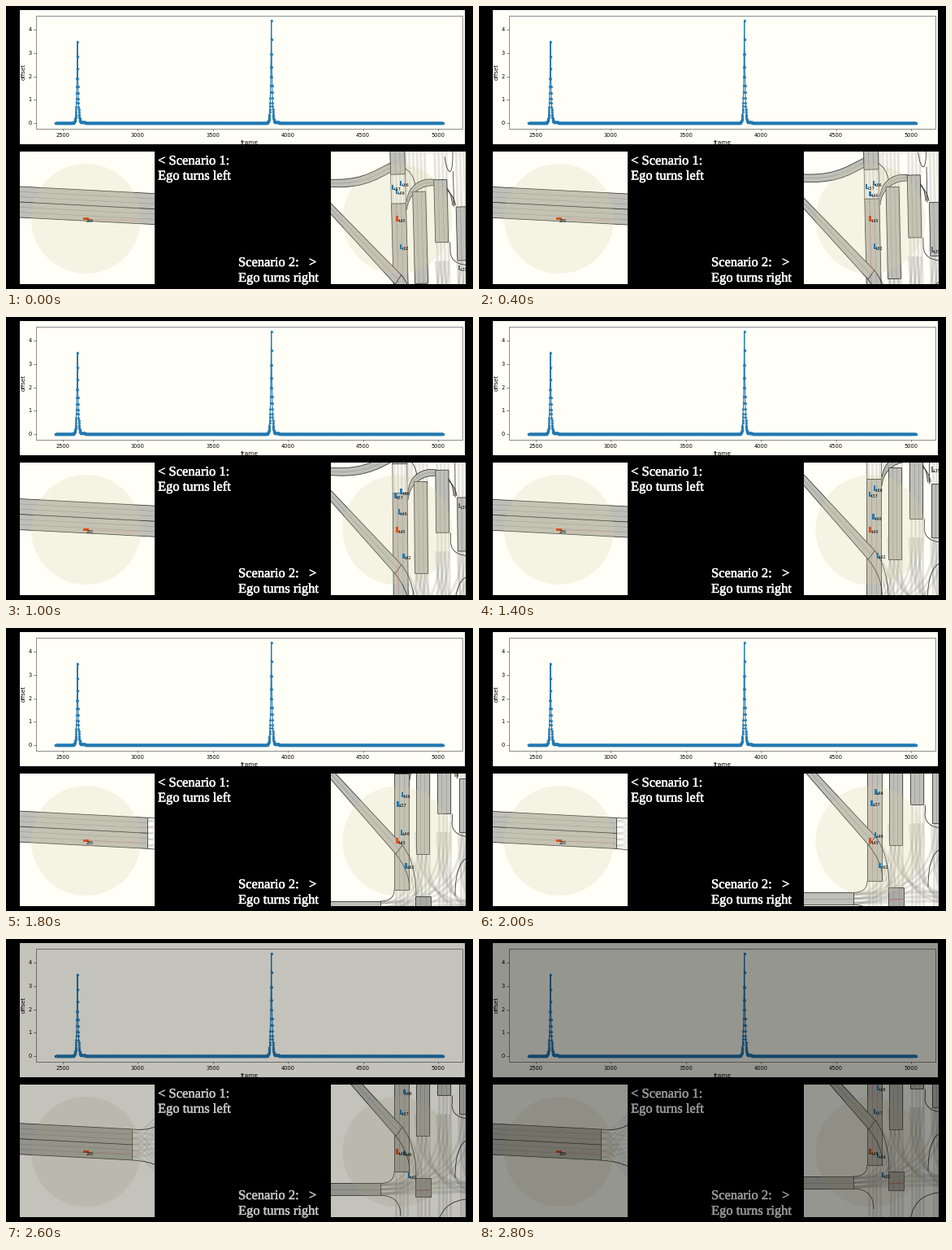
Recreate the animation shown at these times as a matplotlib script. Size 575 px wide and 348 px high, loop 3000 ms.

```python
import numpy as np
import matplotlib.pyplot as plt
from matplotlib.animation import FuncAnimation
from matplotlib.patches import Circle, PathPatch, Rectangle
from matplotlib.path import Path
from matplotlib.patheffects import withStroke
from matplotlib.transforms import Affine2D

W, H, DPI = 575, 348, 100
PT = 72 / DPI
PAPER, BLUE, ORANGE = "#fffff7", "#2279b2", "#d9531e"
DARK, GREY, PINK = "#33332f", "#8c8c88", "#e08a80"
FRAMES, STEP_MS = 15, 200
LAST = FRAMES - 2

fig = plt.figure(figsize=(W / DPI, H / DPI), dpi=DPI, facecolor="black")
ax = fig.add_axes([0, 0, 1, 1])
ax.set(xlim=(0, W), ylim=(H, 0))
ax.axis("off")
ax.autoscale(False)


def label(x, y, text, size, color="black", font="DejaVu Sans", **kw):
    return ax.text(x, y, text, fontsize=size * PT, color=color, family=font, **kw)


def panel(x0, y0, x1, y1):
    return ax.add_patch(Rectangle((x0, y0), x1 - x0, y1 - y0, fc=PAPER, lw=0))


# Offset chart
def chart_x(frame):
    return 70 + (frame - 2500) * 0.1848


def chart_y(offset):
    return 144 - 28.7 * offset


def peak(frame, center, height):
    d = frame - center
    return height * np.exp(-np.abs(d) / 5) + 0.04 * np.exp(-((d - 42) / 12) ** 2)


def draw_chart():
    panel(17, 5, 565, 170)
    ax.add_patch(Rectangle((36.5, 12), 525.5, 138.5, fill=False, ec="#444444", lw=0.6 * PT))
    for tick in range(2500, 5001, 500):
        x = chart_x(tick)
        ax.plot([x, x], [150.5, 153], color="#444444", lw=0.6 * PT)
        label(x, 159.3, str(tick), 6.7, ha="center", va="center")
    for tick in range(5):
        y = chart_y(tick)
        ax.plot([34, 36.5], [y, y], color="#444444", lw=0.6 * PT)
        label(31.5, y, str(tick), 6.7, ha="right", va="center")
    label(299.5, 167.7, "frame", 7.4, ha="center", va="center")
    label(21.7, 81.3, "offset", 7.2, ha="center", va="center", rotation=90)
    frame = np.arange(2452, 5032)
    offset = peak(frame, 2597, 3.5) + peak(frame, 3889, 4.4)
    ax.plot(chart_x(frame), chart_y(offset), color=BLUE, lw=1.1 * PT,
            marker="*", ms=3.7 * PT, mew=0.3)


# Road maps
def curve_path(points):
    kind = {2: Path.LINETO, 3: Path.CURVE3}.get(len(points), Path.CURVE4)
    return Path(points, [Path.MOVETO] + [kind] * (len(points) - 1))


class Scene:
    def __init__(self, x0, y0, x1, y1):
        self.frame = panel(x0, y0, x1, y1)
        self.view = Affine2D()

    def add(self, patch, moving=True):
        if moving:
            patch.set_transform(self.view + ax.transData)
        ax.add_patch(patch)
        patch.set_clip_path(self.frame)
        return patch

    def tag(self, x, y, text):
        text = label(x, y, text, 4.8, va="center", clip_on=True)
        text.set_clip_path(self.frame)
        return text

    def stroke(self, *points, color=DARK, width=0.8, alpha=1.0, moving=True):
        self.add(PathPatch(curve_path(points), fill=False, ec=color,
                           lw=width * PT, alpha=alpha), moving)

    def lane(self, *points, width=3, alpha=0.22):
        self.stroke(*points, color=GREY, width=width, alpha=alpha)

    def corner(self, start, end, draw=None):
        """Leave start horizontally and reach end vertically."""
        (draw or self.stroke)(start, (end[0], start[1]), end)

    def road(self, left, right, lanes=3, fill="#bfbfb9", ends=True):
        left, right = np.array(left, float), np.array(right, float)
        a, b = curve_path(left), curve_path(right[::-1])
        codes = np.concatenate([a.codes, [Path.LINETO], b.codes[1:]])
        outline = Path(np.vstack([left, right[::-1]]), codes)
        self.add(PathPatch(outline, fc=fill, lw=0))
        for k in range(1, lanes):
            self.stroke(*(left + (right - left) * k / lanes),
                        color="#85857f", width=0.5, alpha=0.8)
        self.stroke(*left)
        self.stroke(*right)
        if ends:
            self.stroke(left[0], right[0])
            self.stroke(left[-1], right[-1])

    def upright(self, x, width, top, bottom, **kw):
        self.road([(x, top), (x, bottom)], [(x + width, top), (x + width, bottom)], **kw)

    def halo(self, x, y):
        self.add(Circle((x, y), 67.5, fc="#d6cea4", alpha=0.24, lw=0), False)


class Car:
    """A marker that moves from start to end over the loop."""

    def __init__(self, scene, name, color, start, end, power=1):
        self.start, self.end = np.array(start, float), np.array(end, float)
        self.power = power
        self.body = scene.add(Rectangle((0, 0), 2.6, 6.5, fc=color, lw=0), False)
        self.foot = scene.add(Rectangle((0, 0), 4.5, 1.8, fc=color, lw=0), False)
        self.tag = scene.tag(0, 0, name)

    def move(self, progress):
        x, y = self.start + (self.end - self.start) * progress ** self.power
        self.body.set_xy((x - 1.3, y - 3.2))
        self.foot.set_xy((x - 1.3, y + 1.5))
        self.tag.set_position((x + 1.6, y + 2.6))


def draw_highway(s):
    def edge(y):
        return [(-120, y - 0.052 * 270), (150, y)]

    for y in np.linspace(238, 268, 5):
        for exit_y in (216, 252, 290):
            end = exit_y + (y - 253) / 2
            s.lane((150, y), (175, y), (175, end), (205, end), width=2, alpha=0.16)
    s.road(edge(234), edge(272), lanes=6)
    s.stroke(*edge(253))
    for y, side in ((234, -1), (272, 1)):
        s.stroke((150, y), (168, y + 1.5), (178, y + 2 + side), (198, y + 16 * side))
    s.halo(98.5, 261.5)
    s.stroke((101, 262), (165, 264), color=PINK, alpha=0.5, moving=False)
    s.add(Rectangle((95, 260), 6.5, 2.6, fc=ORANGE, lw=0), False)
    s.tag(98.5, 264, "285")


def draw_city(s):
    columns = [478 + 26.5 * k for k in range(4)]

    # faint lanes crossing the junctions
    for x in columns:
        for dx in np.linspace(2, 16, 4):
            s.lane((x + dx, 60), (x + dx, 390))
    for dx in (-7, -3):
        s.lane((columns[1] + dx, 60), (columns[1] + dx, 154))
    for y in np.linspace(327, 338, 3):
        s.lane((461, y), (575, y - 3), width=4)
        for x in columns[1:]:
            s.corner((461, y), (x + y - 323, 240), s.lane)
            s.corner((580, y), (x + y - 327, 240), s.lane)
    for dx in np.linspace(0, 7, 3):
        s.lane((481 + dx, 264 - dx), (500 + dx, 284 - dx), (504 + 1.4 * dx, 322))

    # paved roads
    s.road([(385, 134), (440, 142), (455, 128), (480, 117)],
           [(385, 143), (440, 152), (460, 138), (480, 128)], lanes=2)
    s.road([(497, 166), (499, 132), (552, 126), (553, 172)],
           [(497, 176), (500, 140), (552, 136), (557, 172)],
           lanes=2, ends=False)
    s.stroke((496, 125), (505, 130), (508, 145))
    s.stroke((545, 112), (548, 138), (556, 138), (555, 100))
    s.upright(columns[0], 18, 60, 132)
    for x, (top, bottom) in zip(columns, ((168, 311), (154, 267), (140, 217), (174, 240))):
        s.upright(x, 16 if x > 478 else 18, top, bottom)
    s.upright(504, 19, 319, 342, fill="#aaaaa4")
    s.road([(340, 97.6), (488, 256)], [(340, 106), (480, 267)], lanes=2)
    s.road([(385, 325), (461, 325)], [(385, 340), (461, 340)], lanes=2)

    # kerbs
    for x in (478, 496):
        s.stroke((x, 132), (x, 168), width=0.6)
    s.stroke((549, 217), (549, 228))
    s.stroke((555, 130), (555, 174))
    for start, end in (((461, 325), (478, 311)), ((461, 340), (486, 365)),
                       ((575, 246), (549, 228)), ((575, 270), (553, 318)),
                       ((575, 344), (530, 390))):
        s.corner(start, end)
    s.stroke((488, 256), (505, 278), (505, 319))
    s.stroke((480, 267), (497, 288), (497, 311))

    s.halo(482, 262)
    s.stroke((484, 170), (484, 300), color=PINK, alpha=0.45)
    s.stroke((504, 334), (522, 333), color="#c0504a", alpha=0.8)


draw_chart()
highway = Scene(17, 179, 183, 342)
city = Scene(400, 179, 566, 342)
draw_highway(highway)
draw_city(city)

cars = [
    Car(city, "L45", ORANGE, (481.5, 261.5), (481.5, 261.5)),
    Car(city, "L62", BLUE, (486, 296), (497, 290)),
    Car(city, "L46", BLUE, (481, 228), (491, 266)),
    Car(city, "L57", BLUE, (476, 223), (487, 212)),
    Car(city, "L66", BLUE, (486, 218), (491, 183), power=2),
    Car(city, "L35", "#66707a", (558, 322), (558, 30)),
]

for x, y, text in [(187, 195, "<"), (200.5, 195, "Scenario 1:"),
                   (187, 213.5, "Ego turns left"), (286, 320, "Scenario 2:"),
                   (373, 320, ">"), (286, 339, "Ego turns right")]:
    label(x, y, text, 16.5, "white", "Liberation Serif", va="baseline",
          path_effects=[withStroke(linewidth=0.35, foreground="white")])

shade = ax.add_patch(Rectangle((0, 0), W, H, fc="black", lw=0, zorder=10))


def update(frame):
    step = max(frame - 1, 0)  # the opening pose is held for two steps
    progress = step / LAST

    highway.view.clear().translate(63 * (1 - progress), 1.8 * (progress - 1))

    scroll = 75 - 8.3 * step + 7 * np.sin(np.pi * min(step / 9, 1))
    drift = -3 * max(0, 1 - step / 8)
    tilt = -1.5 * max(0, 1 - step / 6)
    city.view.clear().translate(drift, scroll).rotate_deg_around(482, 262, tilt)

    for car in cars:
        car.move(progress)
    shade.set_alpha(np.clip(0.06 + 0.176 * (step - 11), 0, 1))
    return []


anim = FuncAnimation(fig, update, frames=FRAMES, interval=STEP_MS,
                     repeat=True, repeat_delay=0)
plt.show()
```
